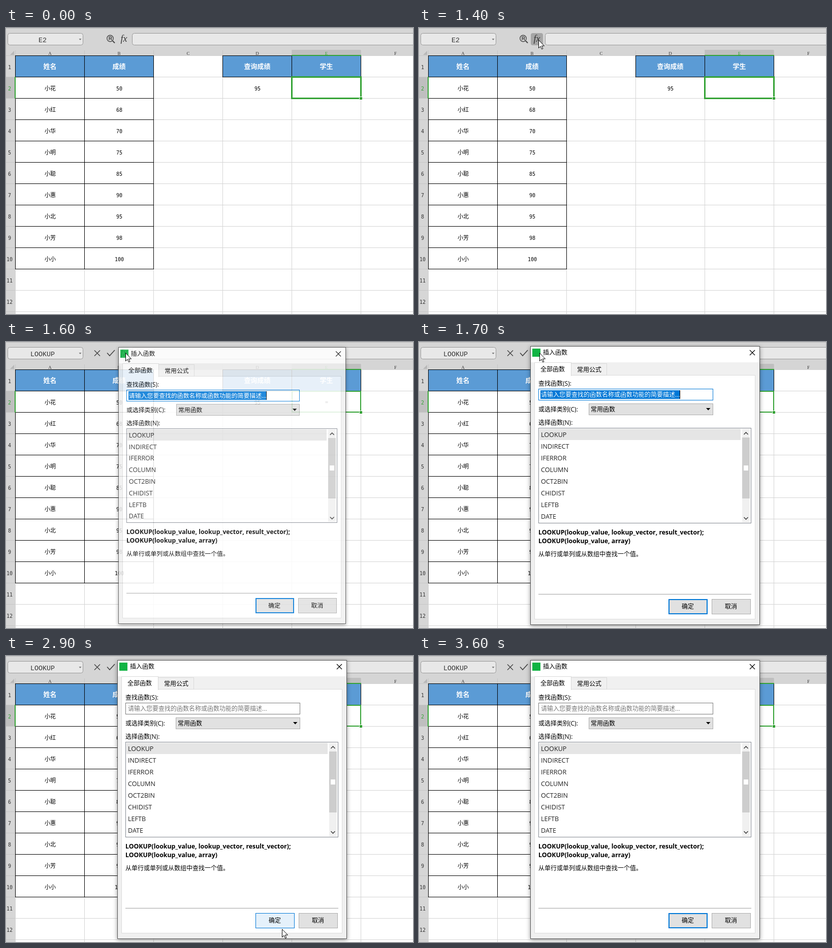
An HTML page that plays this animation: 801x563 px, repeating every 3.9 s.

```html
<!DOCTYPE html>
<html lang="zh-CN">
<head>
<meta charset="utf-8">
<title>插入函数</title>
<style>
html, body { margin: 0; width: 100%; height: 100%; overflow: hidden; background: #fff; }
svg { display: block; width: 801px; height: 563px; }
rect { shape-rendering: crispEdges; }
rect[rx] { shape-rendering: auto; }
text { white-space: pre; }
.ui { font: 12px "Open Sans", "Noto Sans CJK SC", "Noto Sans CJK", sans-serif; }
.fn { font-size: 12.6px; }
.sig { font-size: 12.33px; font-weight: 700; }
.head { font: 700 13px "Noto Sans CJK SC", "Noto Sans CJK", sans-serif; }
.cell { font: 11px "Noto Sans CJK SC", "Noto Sans CJK", sans-serif; }
.num { font: 10px "DejaVu Sans Mono", monospace; }
.col { font: 9px "Liberation Serif", serif; }
.name { font: 13.33px "Liberation Mono", monospace; }
.fx { font: italic 18px "Liberation Serif", serif; }
.mid { text-anchor: middle; }
</style>
</head>
<body>
<svg id="stage" viewBox="0 0 801 563"></svg>
<script>
const LOOP = 3900, STEP = 100;
const GREEN = '#35a336', INK = '#444', BLUE = '#0078d7';
const COL = 136, ROW = 42, LEFT = 18, TOP = 54;
const colX = i => LEFT + COL * i;
const rowY = i => TOP + ROW * i;

function add(parent, tag, attrs, content) {
  const el = document.createElementNS('http://www.w3.org/2000/svg', tag);
  for (const k in attrs) el.setAttribute(k, attrs[k]);
  if (content !== undefined) el.textContent = content;
  parent.appendChild(el);
  return el;
}
const group = (parent, attrs) => add(parent, 'g', attrs);
const rect = (p, x, y, width, height, fill, more) =>
  add(p, 'rect', { x, y, width, height, fill, ...more });
const path = (p, d, stroke, width = 1, fill = 'none') =>
  add(p, 'path', { d, stroke, 'stroke-width': width, fill });
const text = (p, x, y, str, cls, fill = '#000') =>
  add(p, 'text', { x, y, class: cls, fill }, str);

// Bordered box given by its outer edges
function box(p, x, y, x2, y2, fill, edge, w = 1) {
  rect(p, x, y, x2 - x, y2 - y, edge);
  return rect(p, x + w, y + w, x2 - x - 2 * w, y2 - y - 2 * w, fill);
}
function pill(p, x, width) {
  rect(p, x + .5, 10.5, width, 23, '#e8e8e8', { rx: 4, stroke: '#999' });
}
const show = (el, on) => el.setAttribute('visibility', on ? 'visible' : 'hidden');

const stage = document.getElementById('stage');

function drawToolbar(g) {
  rect(g, 0, 0, 801, 54, '#d5d5d5');
  rect(g, 0, 0, 801, 1, '#bebebe');
  pill(g, 3, 148);
  pill(g, 248, 600);
  path(g, 'M143.5 21h5l-2.5 3z', 'none', 0, '#777');
}

function drawSheet(g) {
  rect(g, 0, TOP, LEFT, 509, '#d6d6d6');
  rect(g, 562, 43, COL, 11, '#bfbfbf');
  rect(g, 0, 96, LEFT, ROW, '#bfbfbf');
  path(g, 'M16 45v8H8z', 'none', 0, '#b8b8b8');

  for (let i = 0; i < 6; i++) {
    rect(g, colX(i), TOP, 1, 509, '#d4d4d4');
    rect(g, colX(i), 44, 1, 10, '#c6c6c6');
    text(g, colX(i) + 68.5, 53, 'ABCDEF'[i], 'col mid', i === 4 ? GREEN : '#333');
  }
  for (let i = 0; i < 13; i++) {
    rect(g, LEFT, rowY(i), 783, 1, '#d4d4d4');
    rect(g, 0, rowY(i), LEFT, 1, '#c6c6c6');
    if (i < 12) text(g, 7, rowY(i) + 27, i + 1, 'num mid', i === 1 ? GREEN : '#333');
  }

  for (const c of [0, 1, 3, 4]) rect(g, colX(c), TOP, COL, ROW, '#5b9bd5');
  for (let c = 0; c < 3; c++) rect(g, colX(c), TOP, 1, 421, '#000');
  for (let r = 0; r < 11; r++) rect(g, LEFT, rowY(r), 273, 1, '#000');
  for (let c = 3; c < 6; c++) rect(g, colX(c), TOP, 1, 43, '#000');
  for (let r = 0; r < 2; r++) rect(g, colX(3), rowY(r), 273, 1, '#000');

  const heads = { 0: '姓名', 1: '成绩', 3: '查询成绩', 4: '学生' };
  for (const c in heads) text(g, colX(+c) + 68.5, 80, heads[c], 'head mid', '#fff');
  const scores = [50, 68, 70, 75, 85, 90, 95, 98, 100];
  [...'花红华明聪惠北芳小'].forEach((ch, i) => {
    text(g, 87, rowY(i + 1) + 69 - ROW, '小' + ch, 'cell mid');
    text(g, 223, rowY(i + 1) + 69 - ROW, scores[i], 'num mid');
  });
  text(g, 495, 123, '95', 'num mid');

  rect(g, 562, 53, 137, 2, GREEN);
  rect(g, 17, 96, 2, 43, GREEN);
}

// Selected cell outline with its fill handle
function drawSelection(g, w) {
  const out = w - 1;
  box(g, 562 - (w > 2), 96 - (w > 2), 698 + out, 138 + out, '#fff', GREEN, w);
  rect(g, 695, 135, 6, 6, '#fff');
  rect(g, 696, 136, 5, 5, GREEN);
}

function drawIdle(g) {
  text(g, 72, 28, 'E2', 'name mid', '#333');
  path(g, 'M210 25.5l4 4', INK, 2);
  add(g, 'circle', { cx: 205, cy: 20.5, r: 6.2, fill: 'none', stroke: INK, 'stroke-width': 1.4 });
  path(g, 'M203 24v-6.500h3.200a1.700 1.700 0 0 1 0 3.500H203m3 0l2.500 3', INK, 1.3);
  drawSelection(g, 3);
}

function drawEditing(g) {
  text(g, 72, 28, 'LOOKUP', 'name mid', '#333');
  path(g, 'M174 16.500l11 11m0-11l-11 11', INK, 1.4);
  path(g, 'M199 21.500l5 5.500 10-11', INK, 1.6);
  text(g, 255, 27, '=', 'name', '#333');
  drawSelection(g, 2);
  text(g, 631, 122, '=', 'num mid');
}

function drawDialog(g) {
  rect(g, 219, 8, 452, 549, '#555', { style: 'filter:drop-shadow(0 2px 4px #0006)' });
  rect(g, 220, 9, 450, 547, '#f0f0f0');
  rect(g, 220, 9, 450, 31, '#fff');
  rect(g, 223, 13, 16, 16, '#12b444');
  text(g, 244, 25, '插入函数', 'ui');
  path(g, 'M651 16l10 10m0-10l-10 10', '#000', 1.2);

  box(g, 227, 65, 662, 546, '#fff', '#dcdcdc');
  box(g, 299, 42, 370, 66, '#f0f0f0', '#d9d9d9');
  box(g, 227, 40, 300, 67, '#fff', '#d9d9d9');
  rect(g, 228, 64, 71, 4, '#fff');
  text(g, 239, 58, '全部函数', 'ui');
  text(g, 311, 59, '常用公式', 'ui');

  text(g, 235, 86, '查找函数(S):', 'ui');
  const hint = '请输入您要查找的函数名称或函数功能的简要描述...';
  const active = group(g), blurred = group(g);
  box(active, 235, 92, 579, 115, '#fff', BLUE);
  rect(active, 239, 95, 274, 17, BLUE);
  rect(active, 513, 95, 1, 17, '#000');
  text(active, 240, 108, hint, 'ui', '#fff');
  box(blurred, 235, 92, 579, 115, '#fff', '#7a7a7a');
  text(blurred, 240, 108, hint, 'ui', '#777');

  text(g, 235, 137, '或选择类别(C):', 'ui');
  box(g, 334, 121, 579, 144, '#e1e1e1', '#adadad');
  text(g, 338, 137, '常用函数', 'ui');
  path(g, 'M565 130h8.500l-4.250 4.500z', 'none', 0, '#000');

  text(g, 235, 163, '选择函数(N):', 'ui');
  box(g, 235, 169, 654, 357, '#fff', '#828790');
  rect(g, 237, 171, 396, 22, '#e5e5e5');
  ['LOOKUP', 'INDIRECT', 'IFERROR', 'COLUMN', 'OCT2BIN', 'CHIDIST', 'LEFTB', 'DATE']
    .forEach((s, i) => text(g, 240, 187 + 23 * i, s, 'ui fn', '#222'));
  rect(g, 636, 171, 15, 184, '#f0f0f0');
  rect(g, 636, 188, 15, 120, '#cdcdcd');
  rect(g, 639, 243, 9, 10, '#fff');
  path(g, 'M639.500 182l4-4 4 4M639.500 345l4 4 4-4', '#444', 1.6);

  text(g, 235, 379, 'LOOKUP(lookup_value, lookup_vector, result_vector);', 'ui sig');
  text(g, 235, 396, 'LOOKUP(lookup_value, array)', 'ui sig');
  text(g, 235, 422, '从单行或单列或从数组中查找一个值。', 'ui');
  rect(g, 235, 496, 419, 1, '#a0a0a0');

  box(g, 491, 506, 568, 536, '#e1e1e1', BLUE, 2);
  const hover = group(g);
  box(hover, 491, 506, 568, 536, '#e5f1fb', BLUE);
  text(g, 529, 525, '确定', 'ui mid');
  box(g, 576, 506, 653, 536, '#e1e1e1', '#adadad');
  text(g, 614, 525, '取消', 'ui mid');
  return { active, blurred, hover };
}

drawToolbar(group(stage));
const fxBack = rect(stage, 220, 10, 24, 24, '#a6a6a6', { rx: 4 });
text(stage, 232, 27, 'fx', 'fx mid', '#333');
drawSheet(group(stage));
const idle = group(stage), editing = group(stage), dialog = group(stage);
drawIdle(idle);
drawEditing(editing);
const parts = drawDialog(dialog);
const cross = path(stage, 'M-2.500-6.500h5v4h4v5h-4v4h-5v-4h-4v-5h4z', '#000', 1.6, '#fff');
const arrow = path(stage, 'M.5.8v15.700l3.600-3.400 2.500 5.500 2.300-1-2.400-5.400h5z', '#000', 1, '#fff');

// Pointer moves: start time, then one x,y per step; the last place holds
const moves = [
  { t: 200, el: cross, at: [[686, 90], [680, 96], [670, 103], [660, 109]] },
  { t: 800, el: cross, at: [[336, 73], [296, 62]] },
  { t: 1000, el: arrow, at: [[264, 40], [246, 30], [238, 25], [235, 23]] },
  { t: 1600, el: arrow, at: [[235, 21], [237, 21], [258, 42], [288, 73]] },
  { t: 2000, el: arrow, at: [[368, 118], [452, 158], [502, 181]] },
  { t: 2400, el: arrow, at: [[552, 224], [622, 330], [601, 432], [562, 506], [548, 526], [543, 537]] },
  { t: 3000, el: arrow, at: [[562, 516], [603, 452], [655, 365], [707, 270], [752, 188], [779, 142]] },
  { t: 3600, el: null, at: [] }
];

function placePointer(t) {
  const move = moves.filter(m => m.t <= t).pop();
  const el = move && move.el;
  show(cross, el === cross);
  show(arrow, el === arrow);
  if (!el) return;
  const i = Math.min((t - move.t) / STEP, move.at.length - 1);
  el.setAttribute('transform', `translate(${move.at[i]})`);
}

function draw(t) {
  const editMode = t >= 1500;
  show(idle, !editMode);
  show(editing, editMode);
  show(fxBack, t >= 1200 && !editMode);

  const opening = t === 1600;
  dialog.setAttribute('display', t >= 1600 ? 'inline' : 'none');
  dialog.setAttribute('opacity', opening ? .86 : 1);
  dialog.setAttribute('transform', opening
    ? 'translate(445 282.500) scale(.991) translate(-445 -282.500)' : '');
  show(parts.active, t < 2400);
  show(parts.blurred, t >= 2400);
  show(parts.hover, t >= 2700 && t < 3000);
  placePointer(t);
}

const start = performance.now();
function tick() {
  const t = (performance.now() - start) % LOOP;
  draw(Math.floor(t / STEP) * STEP);
  requestAnimationFrame(tick);
}
tick();
</script>
</body>
</html>
```
